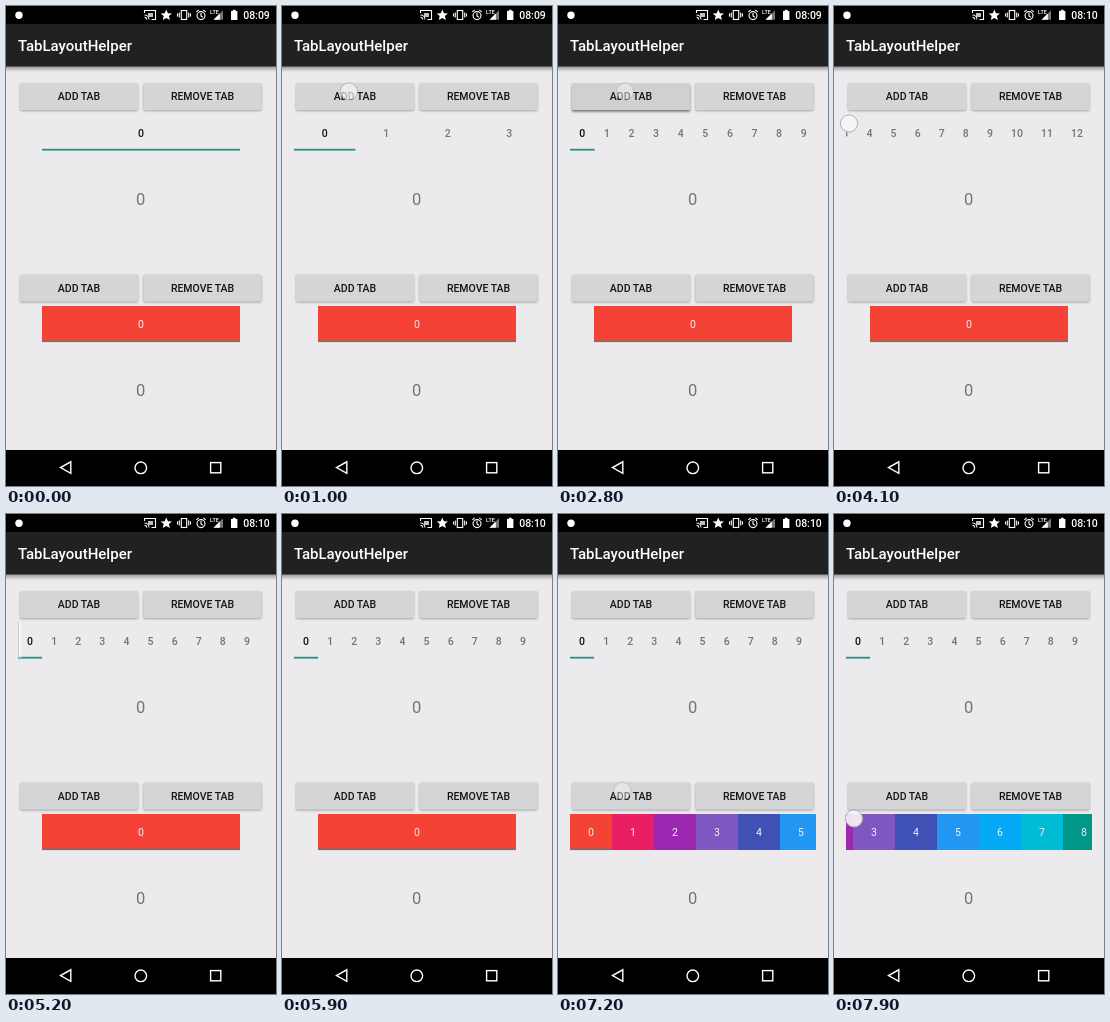
Animation of 270x480 px, one loop 8 s. Source, as an HTML page:

```html
<!DOCTYPE html>
<html lang="en">
<head>
<meta charset="utf-8">
<title>Tab layout demo</title>
<style>
  html, body { margin: 0; width: 100%; height: 100%; overflow: hidden; background: #eceaed; }
  svg { display: block; width: 100vw; height: 100vh; }
  text { font: 500 10.5px Roboto, sans-serif; text-anchor: middle; fill: #151515; }
  .title { font-size: 15px; text-anchor: start; fill: #fff; }
  .clock { text-anchor: start; fill: #fff; }
  .page { font-size: 16.5px; font-weight: 400; fill: #757477; }
  .tab { fill: #747376; }
  .tab.on { fill: #111; }
  .chip { font-weight: 400; fill: #f8eef2; }
  .line { fill: none; stroke: #fff; stroke-width: 1.4; }
  .solid { fill: #fff; }
</style>
</head>
<body>
<svg id="stage" viewBox="0 0 270 480">
  <defs>
    <clipPath id="strip"><rect x="12" y="105" width="246" height="232"/></clipPath>
    <linearGradient id="drop" x2="0" y2="1">
      <stop stop-color="#000" stop-opacity=".38"/><stop offset="1" stop-color="#000" stop-opacity="0"/>
    </linearGradient>
    <linearGradient id="edge">
      <stop stop-color="#888" stop-opacity=".5"/><stop offset=".25" stop-color="#fff" stop-opacity=".6"/>
      <stop offset="1" stop-color="#fff" stop-opacity="0"/>
    </linearGradient>
    <filter id="soft" x="-10%" y="-30%" width="120%" height="170%"><feGaussianBlur stdDeviation="1"/></filter>
  </defs>

  <rect width="270" height="480" fill="#eceaed"/>
  <rect y="60" width="270" height="6" fill="url(#drop)"/>
  <rect y="18" width="270" height="42.5" fill="#212121"/>
  <rect width="270" height="18" fill="#000"/>
  <rect y="444" width="270" height="36" fill="#000"/>
  <text class="title" x="12" y="45.2">TabLayoutHelper</text>

  <!-- status bar -->
  <circle class="solid" cx="13" cy="9.3" r="3.7"/>
  <g class="line" stroke-width="1" style="stroke-width:1.1">
    <path d="M138.5 7V4.5h11v9h-4M138.5 9a4.5 4.5 0 0 1 4.5 4.5M138.5 11.3a2.2 2.2 0 0 1 2.2 2.2"/>
    <rect x="175.3" y="4.5" width="5.4" height="9"/>
    <path d="M173.3 6.5v5M171.5 7.5v3M182.7 6.5v5M184.5 7.5v3"/>
    <circle cx="195" cy="9.6" r="4"/>
    <path d="M195 7v3l1.8 1.2M190.3 5.8l2.4-2M199.7 5.8l-2.4-2"/>
  </g>
  <rect class="solid" x="142" y="7" width="5" height="4" opacity=".75"/>
  <path class="solid" d="M160.3 3.5l1.6 3.7 4 .3-3 2.6 1 4-3.6-2.2-3.5 2.2.9-4-3-2.6 4-.3z"/>
  <path d="M217 4.3v9.5h-9.5z" fill="#777"/>
  <path class="solid" d="M213.8 7.5v6.3h-6.3z"/>
  <text x="208.4" y="8.2" style="font-size:5.5px;fill:#fff">LTE</text>
  <path class="solid" d="M225 5h1.8V3.7h2.8V5h1.8v9h-6.4z"/>
  <text class="clock" id="clock" x="237.2" y="13.1">08:09</text>

  <!-- navigation bar -->
  <path class="line" d="M64.8 455.8v11.6l-10.3-5.8z"/>
  <circle class="line" cx="134.8" cy="461.8" r="5.8"/>
  <rect class="line" x="204.6" y="456.6" width="10.2" height="10.2"/>

  <g id="buttons"></g>
  <text class="page" x="134.6" y="198.8">0</text>
  <text class="page" x="134.6" y="390.3">0</text>
  <g id="tabs" clip-path="url(#strip)"></g>
  <rect id="glow" x="12" y="108" width="5" height="36" fill="url(#edge)"/>
  <circle id="finger" r="8.6" fill="#f7f6f8" stroke="#a9a8ab" stroke-width="1"/>
</svg>
<script>
const LOOP = 8000, STEP = 100, LEFT = 12, WIDTH = 246, MAX_TAB = 198;
const PALETTE = ['#f44336', '#e91e63', '#9c27b0', '#7e57c2', '#3f51b5', '#2196f3',
  '#03a9f4', '#00bcd4', '#009688'];
const $ = id => document.getElementById(id);

function add(parent, tag, attrs, label) {
  const el = document.createElementNS('http://www.w3.org/2000/svg', tag);
  set(el, attrs);
  if (label !== undefined) el.textContent = label;
  parent.appendChild(el);
  return el;
}
function set(el, attrs) {
  for (const key in attrs) el.setAttribute(key, attrs[key]);
}

function makeButton(x, y, label) {
  const box = { x, y, width: 118, height: 27, rx: 1.5 };
  const shadow = add($('buttons'), 'rect', { ...box, filter: 'url(#soft)' });
  const face = add($('buttons'), 'rect', box);
  add($('buttons'), 'text', { x: x + 59, y: y + 17.3 }, label);
  return pressed => {
    set(shadow, { y: y + (pressed ? 1.8 : 0.9), fill: '#000', opacity: pressed ? 0.5 : 0.3 });
    set(face, { fill: pressed ? '#d0cfd1' : '#d5d4d6' });
  };
}

// Taps add one tab each; a drag is [time, finger x, scroll] keys.
const rows = [
  {
    taps: { first: 430, gap: 280, count: 12, x: 67, y: 85.5 },
    tabWidth: i => i < 10 ? 24.1 : 30,
    textY: 130.8, lineY: 142.8, lineColor: '#209587', dragY: 117.5,
    drags: [
      [[3750, 205, 0], [3850, 155, 38], [4000, 62, 85], [4100, 15, 85], [4250, 12, 85]],
      [[4500, 40, 85], [4650, 80, 56], [4850, 150, 8], [5050, 225, 0]]
    ]
  },
  {
    taps: { first: 6200, gap: 190, count: 8, x: 64.3, y: 276.8 },
    tabWidth: () => 42,
    textY: 322.2, lineY: 334.3, lineColor: '#7b7069', dragY: 304.5, colors: PALETTE,
    drags: [[[7600, 190, 0], [7700, 142, 42], [7800, 72, 88], [7900, 20, 119]]]
  }
];

rows.forEach((row, r) => {
  const y = r ? 268.5 : 77;
  row.press = makeButton(14, y, 'ADD TAB');
  makeButton(137.5, y, 'REMOVE TAB')(false);
  row.tabs = Array.from({ length: row.taps.count + 1 }, (_, i) => ({
    box: row.colors && add($('tabs'), 'rect', { y: 300, height: 36, fill: row.colors[i] }),
    text: add($('tabs'), 'text', {
      y: row.textY, class: row.colors ? 'chip' : i ? 'tab' : 'tab on'
    }, i)
  }));
  row.line = add($('tabs'), 'rect', { y: row.lineY, height: 1.8, fill: row.lineColor });
});

function along(keys, t, column) {
  if (t <= keys[0][0]) return keys[0][column];
  for (let i = 1; i < keys.length; i++) {
    const a = keys[i - 1], b = keys[i];
    if (t <= b[0]) return a[column] + (b[column] - a[column]) * (t - a[0]) / (b[0] - a[0]);
  }
  return keys[keys.length - 1][column];
}

function tapState({ first, gap, count }, t) {
  const hold = Math.min(160, gap * 0.6);
  let alpha = 0, pressed = false;
  for (let i = 0; i < count; i++) {
    const since = t - (first + i * gap);
    if (since >= -hold && since < 0) {
      pressed = true;
      alpha = 0.45 + 0.4 * Math.min(1, (since + hold) / 25);
      if (since + hold < 15) alpha = 0.5;
    } else if (since >= 0 && since < 110) {
      alpha = Math.max(alpha, 0.75 * (1 - since / 130));
    }
  }
  return { alpha, pressed };
}

function layout(row, t) {
  const { first, gap, count } = row.taps;
  const total = 1 + Math.max(0, Math.min(count, Math.floor((t - first) / gap) + 1));
  let widths = row.tabs.slice(0, total).map((_, i) => row.tabWidth(i));
  const content = widths.reduce((a, b) => a + b, 0);
  let x = LEFT;
  if (content <= WIDTH) {
    const w = Math.min(MAX_TAB, WIDTH / total);
    widths = widths.map(() => w);
    x += (WIDTH - w * total) / 2;
  } else {
    const drag = row.drags.filter(d => t >= d[0][0]).pop();
    if (drag) x -= along(drag, t, 2);
  }
  set(row.line, { x, width: widths[0] });
  row.tabs.forEach(({ box, text }, i) => {
    const shown = i < total ? 'visible' : 'hidden';
    const w = widths[i] || 0;
    set(text, { x: x + w / 2, visibility: shown });
    if (box) set(box, { x, width: w, visibility: shown });
    x += w;
  });
}

function draw(t) {
  const finger = { cx: 0, cy: 0, opacity: 0 };
  for (const row of rows) {
    layout(row, t);
    const { alpha, pressed } = tapState(row.taps, t);
    row.press(pressed);
    if (alpha) Object.assign(finger, { cx: row.taps.x, cy: row.taps.y, opacity: alpha });
    for (const drag of row.drags) {
      const end = drag[drag.length - 1][0];
      if (t >= drag[0][0] && t <= end) {
        Object.assign(finger, { cx: along(drag, t, 1), cy: row.dragY, opacity: 0.9 });
      }
    }
  }
  set($('finger'), finger);
  const glow = t < 4850 ? 0 : Math.min((t - 4850) / 150, 1, (5500 - t) / 300);
  set($('glow'), { opacity: Math.max(0, glow) });
  $('clock').textContent = t < 3500 ? '08:09' : '08:10';
}

const start = performance.now();
function tick() {
  const t = (performance.now() - start) % LOOP;
  draw(Math.floor(t / STEP) * STEP);
  requestAnimationFrame(tick);
}
draw(0);
requestAnimationFrame(tick);
</script>
</body>
</html>
```
